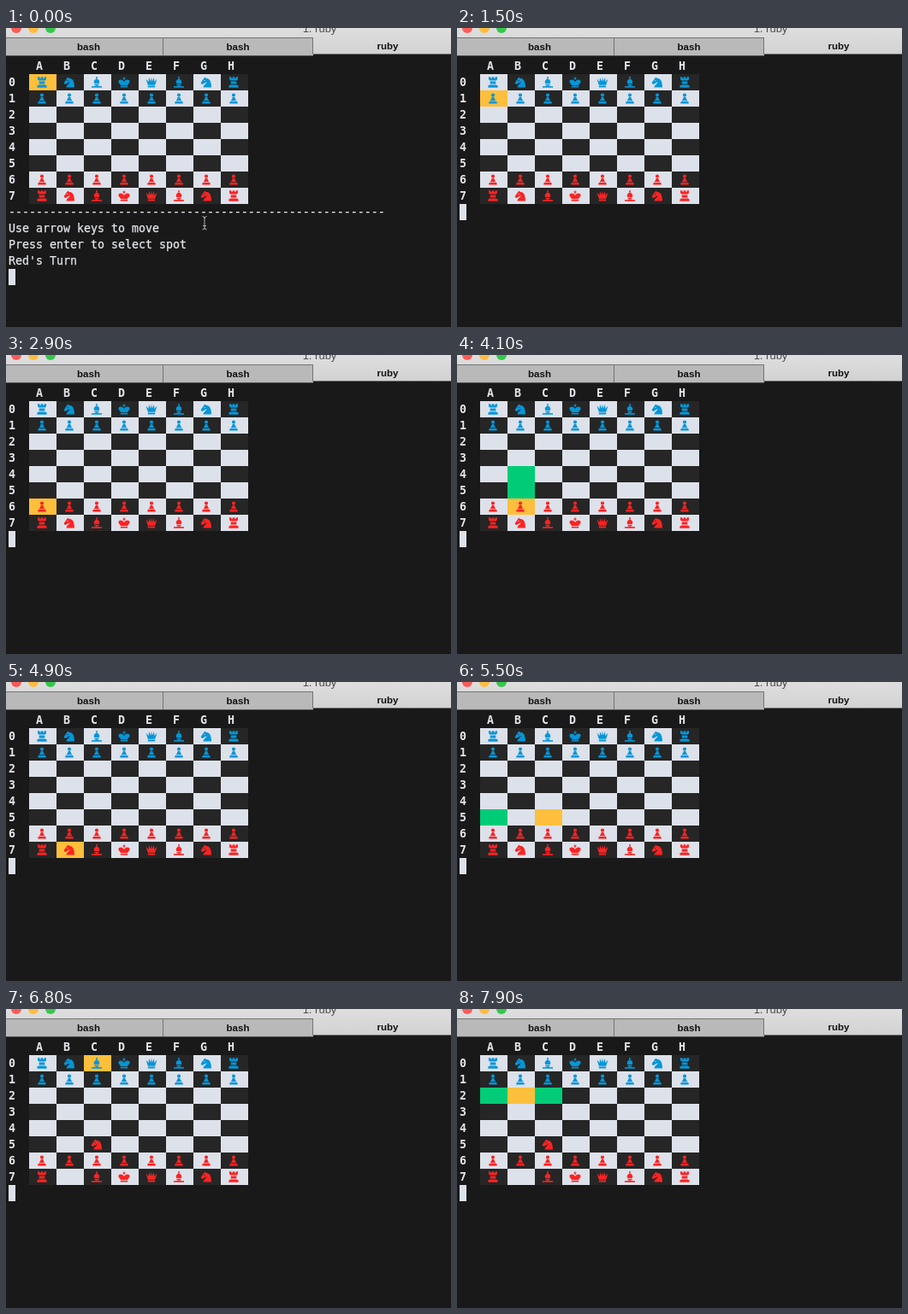
Recreate the animation shown at these times as an HTML page. Size 520x350 px, loop 8 s.

```html
<!DOCTYPE html>
<html lang="en">
<head>
<meta charset="utf-8">
<title>Terminal chess</title>
<style>
html, body { margin: 0; width: 100%; height: 100%; overflow: hidden; background: #191919; }
svg { display: block; width: 520px; height: 350px; }
.mono { font: 13.29px "DejaVu Sans Mono", monospace; fill: #e4e7ec; white-space: pre; }
.label { font-weight: bold; }
.line { stroke: #e4e7ec; stroke-width: .25px; }
.tab { font: bold 11.5px "Liberation Sans", Arial, sans-serif; fill: #111; text-anchor: middle; }
.title { font: 13px "Liberation Sans", Arial, sans-serif; fill: #4c4c4c; text-anchor: middle; }
</style>
</head>
<body>
<svg id="stage" viewBox="0 0 520 350">
  <defs>
    <linearGradient id="bar" x1="0" y1="0" x2="0" y2="1">
      <stop offset="0" stop-color="#dedede"/><stop offset="1" stop-color="#d2d2d2"/>
    </linearGradient>
  </defs>
  <rect width="520" height="350" fill="#191919"/>
  <rect width="520" height="31" fill="url(#bar)"/>
  <rect y="11" width="359" height="21" fill="#b9b9b9"/>
  <path d="M0 11.5H359M183.5 12V32M358.5 11V30.5H520" fill="none" stroke="#747474"/>
  <path d="M0 32.5H359" stroke="#555"/>
  <circle cx="12" cy="0" r="6" fill="#fc5b57"/>
  <circle cx="32" cy="0" r="6" fill="#fdbc40"/>
  <circle cx="52" cy="0" r="6" fill="#34c84a"/>
  <text class="title" x="366.5" y="5">1. ruby</text>
  <text class="tab" x="96.5" y="26">bash</text>
  <text class="tab" x="271" y="26">bash</text>
  <text class="tab" x="446" y="25">ruby</text>
  <g id="squares"></g>
  <g id="pieces"></g>
  <g id="labels"></g>
  <g id="help"></g>
  <path id="pointer" d="M229.5 220.5Q232 220.5 232 223V233.500Q232 236 229.500 236M234.500 220.500Q232 220.500 232 223M232 233.500Q232 236 234.500 236M230 231.500H234" fill="none" stroke="#b4b4b4"/>
  <rect id="caret" x="3" width="8" height="19" fill="#dde1ea"/>
</svg>
<script>
const LOOP = 8000, LEFT = 27, TOP = 54, CW = 32, CH = 19;
const LIGHT = '#dde1ea', DARK = '#262626', CURSOR = '#fdbf3c', MOVE = '#00cc78';
const BLUE = '#0596d7', RED = '#fb2323';

const SHAPES = {
  rook: 'M-5-6.2h2.4v1.4h1.4v-1.4h2.4v1.4h1.4v-1.4H5v3L3.600-2h-7.200L-5-3.200z' +
        'M-3.300-1.100h6.600v3.200h-6.600zM-3.700 3h7.400L5.600 4v2.300H-5.600V4z',
  knight: 'M-1.5-6L-.5-4.800C4-4.800 6-1 6 6H-3.500C-3.500 3 .5 2 .5-.5C-1.500 1-3 1-4.200 2.600' +
          'L-6.300 1.500C-6-1-4-2-3.200-4zM-2.600-2.500h1v1h-1z',
  bishop: 'M-1-5.600a1 1 0 0 1 2 0a1 1 0 0 1-2 0zM0-4.500C2.500-3 3.600-1.400 3.200.4L2.400 1.800H-2.400' +
          'L-3.200.4C-3.600-1.400-2.500-3 0-4.500zM-2.600 2.400h5.200v1.200h-5.200z' +
          'M-6 6.200V4.600Q-2 4.800-.8 3.800H.8Q2 4.800 6 4.600V6.200z',
  king: 'M-.6-6h1.200v1h1v1h-1v1.400h-1.200v-1.400h-1v-1h1z' +
        'M0-.6C1-3.600 6.400-4 6.600-1C6.600 1 4.400 2.400 4 3.400H-4C-4.400 2.400-6.600 1-6.600-1C-6.400-4-1-3.600 0-.6z' +
        'M-4.200 4.200h8.400v1.800h-8.400z',
  queen: 'M-6.500-4L-3.400-.4L-3-5.400L-.9-1L0-6L.9-1L3-5.400L3.400-.4L6.500-4L4.200 3.200H-4.200z' +
         'M-4.200 4h8.400v2h-8.400z',
  pawn: 'M-2.100-3.900a2.100 2.100 0 0 1 4.200 0a2.100 2.100 0 0 1-4.200 0zM-1.400-1.500H1.400Q1.600 1 3.300 2.600H-3.300Q-1.600 1-1.400-1.500z' +
        'M-4.700 6V4.300L-3.600 3.300H3.600L4.700 4.300V6z'
};
const BACK = ['rook', 'knight', 'bishop', 'king', 'queen', 'bishop', 'knight', 'rook'];

// time, cursor square, squares open to the selected piece
const STEPS = [
  [0, 'A0'], [1300, 'A1'], [2100, 'A2'], [2300, 'A3'], [2500, 'A4'], [2700, 'A5'], [2900, 'A6'],
  [3000, 'B6'], [4100, 'B6', 'B4 B5'], [4400, 'B6'],
  [4800, 'B7'], [5000, 'B7', 'A5 C5'], [5200, 'B6', 'A5 C5'], [5300, 'B5', 'A5 C5'],
  [5500, 'C5', 'A5 C5'], [5600, 'C5'],
  [5900, 'C4'], [6100, 'C3'], [6300, 'C2'], [6500, 'C1'], [6800, 'C0'], [7000, 'B0'],
  [7200, 'B0', 'A2 C2'], [7600, 'B1', 'A2 C2'], [7800, 'B2', 'A2 C2']
];
const CLEARED = 1300, KNIGHT_MOVE = 5600;

const $ = id => document.getElementById(id);
const squares = {};

function add(parent, tag, attrs, text) {
  const el = document.createElementNS('http://www.w3.org/2000/svg', tag);
  for (const k in attrs) el.setAttribute(k, attrs[k]);
  if (text) el.textContent = text;
  return $(parent).appendChild(el);
}

function place(piece, col, row) {
  piece.setAttribute('transform', `translate(${LEFT + col * CW + 15} ${TOP + row * CH + 9.5})`);
}

function addPiece(kind, col, row) {
  const piece = add('pieces', 'path', {
    d: SHAPES[kind], fill: row < 2 ? BLUE : RED, 'fill-rule': 'evenodd'
  });
  place(piece, col, row);
  return piece;
}

function label(x, y, text) {
  add('labels', 'text', { class: 'mono label', x, y }, text);
}

let knight;
for (let i = 0; i < 8; i++) {
  label(LEFT + i * CW + 8, TOP - 5, 'ABCDEFGH'[i]);
  label(3, TOP + i * CH + 14, String(i));
  for (let c = 0; c < 8; c++) {
    const base = (i + c) % 2 ? DARK : LIGHT;
    const el = add('squares', 'rect', {
      x: LEFT + c * CW, y: TOP + i * CH, width: CW, height: CH, fill: base
    });
    squares['ABCDEFGH'[c] + i] = { el, base };
  }
  addPiece(BACK[i], i, 0);
  addPiece('pawn', i, 1);
  addPiece('pawn', i, 6);
  const piece = addPiece(BACK[i], i, 7);
  if (i === 1) knight = piece;
}

['-'.repeat(55), 'Use arrow keys to move', 'Press enter to select spot', "Red's Turn"]
  .forEach((text, i) => add('help', 'text', { class: 'mono line', x: 3, y: 220 + i * CH }, text));

function draw(t) {
  const [, cursor, open = ''] = STEPS.filter(s => s[0] <= t).pop();
  for (const id in squares) {
    const { el, base } = squares[id];
    el.setAttribute('fill', id === cursor ? CURSOR : open.includes(id) ? MOVE : base);
  }
  if (t < KNIGHT_MOVE) place(knight, 1, 7);
  else place(knight, 2, 5);
  const intro = t < CLEARED;
  $('help').style.display = $('pointer').style.display = intro ? '' : 'none';
  $('caret').setAttribute('y', intro ? 282 : 206);
}

const start = performance.now();
function tick() {
  draw((performance.now() - start) % LOOP);
  requestAnimationFrame(tick);
}
tick();
</script>
</body>
</html>
```
